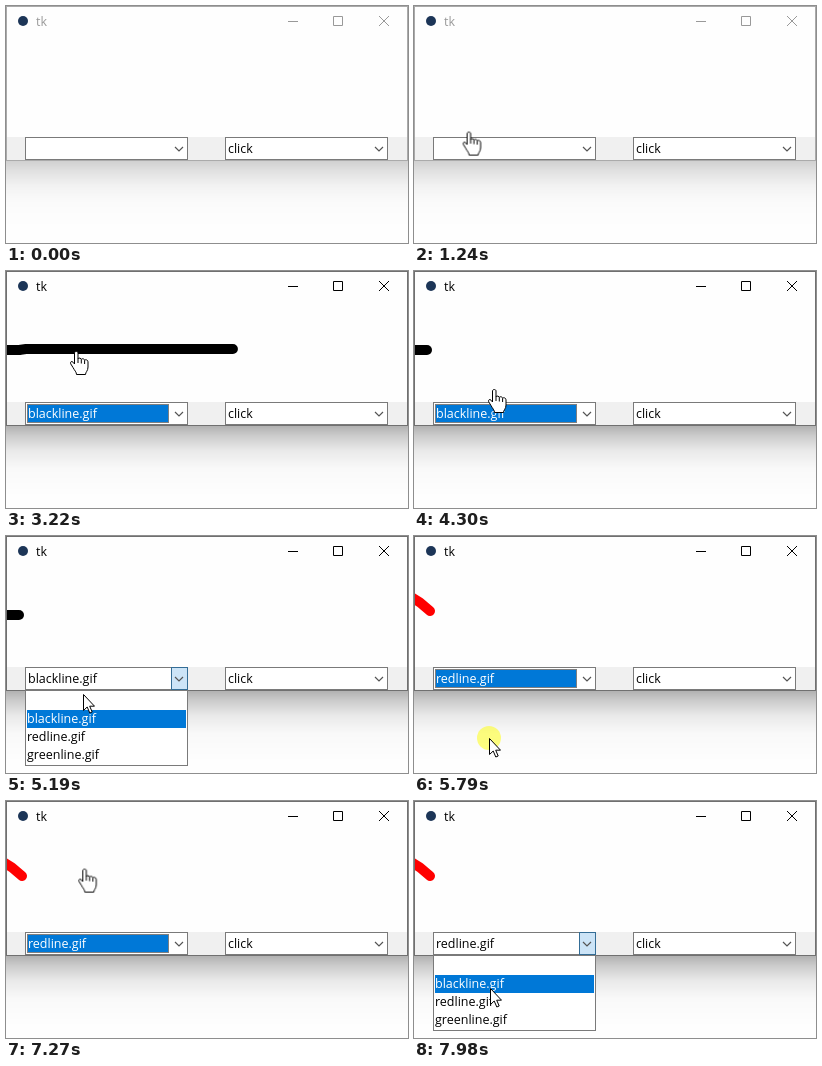
These frames come from a looping animation (402x237 px, 8000 ms). An HTML page:

```html
<!DOCTYPE html>
<html lang="en">
<head>
<meta charset="utf-8">
<title>tk</title>
<style>
html, body { margin: 0; width: 100%; height: 100%; overflow: hidden; background: #fefefe; }
svg { display: block; width: 402px; height: 237px; font: 12.5px "Open Sans", "Noto Sans", sans-serif; }

/* hard switches by default, all on one 8 s clock */
.a { animation: 8s step-end infinite; }

.ink { animation-name: ink; }
.frame { animation-name: frame; }
.shadow { animation-name: shadow; }
.open { animation-name: open; }
.sel { animation-name: sel; }
.value { animation-name: value; }
.black { animation-name: black; }
.red { animation-name: red; }
.row0 { animation-name: row0; }
.row1 { animation-name: row1; }
.row2 { animation-name: row2; }
.drawBlack { animation-name: drawBlack; stroke-dasharray: 400 500; }
.drawRed { animation-name: drawRed; stroke-dasharray: 100 200; }
.click { animation-name: click; }
.hand { animation-name: hand; }
.arrow { animation-name: arrow; }
.pointer { animation: move 8s ease-in-out infinite; }

@keyframes ink { 0% { color: #999 } 17.25%, 100% { color: #000 } }
@keyframes frame { 0% { stroke: #aaa } 17.25%, 100% { stroke: #707070 } }
@keyframes shadow { 0% { opacity: .6 } 17.25%, 100% { opacity: 1 } }
@keyframes open {
  0%, 28.2%, 72% { opacity: 0 }
  18.85%, 62%, 97.85%, 100% { opacity: 1 }
}
@keyframes sel {
  0%, 62%, 97.85%, 100% { opacity: 0 }
  28.2%, 72% { opacity: 1 }
}
@keyframes value {
  0%, 62%, 97.85%, 100% { fill: #000 }
  28.2%, 72% { fill: #fff }
}
@keyframes black { 0%, 72%, 100% { opacity: 0 } 28.2% { opacity: 1 } }
@keyframes red { 0% { opacity: 0 } 72%, 100% { opacity: 1 } }
@keyframes row0 {
  0%, 22.3%, 65.46%, 98.95%, 100% { opacity: 0 }
  21%, 65.2%, 98.5% { opacity: 1 }
}
@keyframes row1 {
  0%, 65.2%, 65.9% { opacity: 0 }
  22.3%, 65.46%, 98.95%, 100% { opacity: 1 }
}
@keyframes row2 { 0%, 98.5%, 100% { opacity: 0 } 65.9% { opacity: 1 } }
@keyframes drawBlack {
  0%, 43.7%, 100% { stroke-dashoffset: 400 }
  37.7% { stroke-dashoffset: 362 }
  38.95% { stroke-dashoffset: 274 }
  40.2% { stroke-dashoffset: 186 }
  41.45% { stroke-dashoffset: 98 }
  42.45% { stroke-dashoffset: 0 }
}
@keyframes drawRed {
  0%, 89.7%, 100% { stroke-dashoffset: 100 }
  81.25% { stroke-dashoffset: 86 }
  82.4% { stroke-dashoffset: 72 }
  83.5% { stroke-dashoffset: 57 }
  84.6% { stroke-dashoffset: 43 }
  85.8% { stroke-dashoffset: 29 }
  86.9% { stroke-dashoffset: 14 }
  88.6% { stroke-dashoffset: 0 }
}
@keyframes click {
  0%, 18.85%, 28.6%, 39%, 63%, 72.5%, 82%, 98.2%, 100% { opacity: 0 }
  17.25%, 27.2%, 36.5%, 61.5%, 71.2%, 80.05%, 96.85% { opacity: .5 }
}
@keyframes hand {
  0%, 16%, 55%, 92.65%, 100% { opacity: 0 }
  12%, 33.95%, 75.15% { opacity: 1 }
}
@keyframes arrow {
  0%, 16%, 55%, 92.65%, 100% { opacity: 1 }
  12%, 33.95%, 75.15% { opacity: 0 }
}
@keyframes move {
  0%, 8.35% { transform: translate(150px, -30px) }
  17.2%, 19.5% { transform: translate(47px, 138px) }
  23.4%, 31.5% { transform: translate(45px, 182px) }
  36.4%, 48.5% { transform: translate(70px, 80px) }
  52.5% { transform: translate(80px, 111px) }
  53.6%, 53.9% { transform: translate(80px, 118px) }
  55.25%, 58.25% { transform: translate(77px, 132px) }
  58.75%, 62.5% { transform: translate(77px, 134px) }
  64.8%, 65.1% { transform: translate(77px, 158px) }
  66.4%, 72.6% { transform: translate(75px, 202px) }
  77.6%, 90.6% { transform: translate(78px, 66px) }
  93.4%, 97.9% { transform: translate(91px, 143px) }
  99.6%, 100% { transform: translate(76px, 187px) }
}
</style>
</head>
<body>
<svg viewBox="0 0 402 237">
  <defs>
    <linearGradient id="fade" x2="0" y2="1">
      <stop offset="0" stop-opacity=".3"/>
      <stop offset=".15" stop-opacity=".19"/>
      <stop offset=".35" stop-opacity=".08"/>
      <stop offset=".6" stop-opacity=".02"/>
      <stop offset="1" stop-opacity="0"/>
    </linearGradient>
    <clipPath id="view"><path d="M1 31H401V131H1Z"/></clipPath>
    <path id="chevron" d="M169 141l4 4 4-4" fill="none" stroke="#555" stroke-width="1.2"/>
    <rect id="box" x="19.5" y="131.5" width="162" height="22" fill="#fff" stroke="#7a7a7a"/>
    <rect id="bar" x="21" y="156" width="159" height="18" fill="#0078d7"/>
  </defs>

  <!-- window -->
  <rect width="402" height="237" fill="#fefefe"/>
  <rect class="a shadow" y="155" width="402" height="71" fill="url(#fade)"/>
  <path d="M1 131H401V154H1Z" fill="#f0f0f0"/>
  <rect class="a frame" x=".5" y=".5" width="401" height="154" fill="none" stroke="#707070"/>
  <circle cx="17" cy="15" r="5" fill="#1c3557"/>
  <g class="a ink">
    <text x="30" y="20" fill="currentColor">tk</text>
    <path d="M282 15.5h10M327.5 10.5h9v9h-9zM373 10l10 10M383 10l-10 10" fill="none" stroke="currentColor"/>
  </g>

  <!-- strokes -->
  <g clip-path="url(#view)" fill="none" stroke-linecap="round" stroke-linejoin="round" stroke-width="10">
    <g class="a black" stroke="#000">
      <path d="M-5 79H13"/>
      <path class="a drawBlack" d="M13 79L20 78H315L350 75L380 73.5H410"/>
    </g>
    <g class="a red" stroke="#f00">
      <path d="M-3 61L6 66.5L16 75"/>
      <path class="a drawRed" pathLength="100" d="M16 75C40 95 50 102 70 102S110 56 135 56 175 102 200 102 240 56 265 56 300 85 325 90"/>
    </g>
  </g>

  <!-- combo boxes -->
  <use href="#box"/>
  <g class="a sel">
    <rect x="21" y="133" width="142" height="19" fill="#0078d7"/>
    <rect x="21.5" y="133.5" width="141" height="18" fill="none" stroke="#ff8728" stroke-dasharray="1 1"/>
  </g>
  <g class="a value">
    <text class="a black" x="22" y="147">blackline.gif</text>
    <text class="a red" x="22" y="147">redline.gif</text>
  </g>
  <use href="#chevron"/>
  <use href="#box" x="200"/>
  <use href="#chevron" x="200"/>
  <text x="222" y="147">click</text>

  <!-- drop-down list -->
  <g class="a open">
    <rect x="165.5" y="131.5" width="16" height="22" fill="#cce4f7" stroke="#346d96"/>
    <use href="#chevron"/>
    <rect x="19.5" y="154.5" width="162" height="75" fill="#fff" stroke="#7a7a7a"/>
    <text x="21" y="187">blackline.gif</text>
    <text x="21" y="205">redline.gif</text>
    <text x="21" y="223">greenline.gif</text>
    <use class="a row0" href="#bar"/>
    <g class="a row1"><use href="#bar" y="18"/><text x="21" y="187" fill="#fff">blackline.gif</text></g>
    <g class="a row2"><use href="#bar" y="36"/><text x="21" y="205" fill="#fff">redline.gif</text></g>
  </g>

  <!-- pointer -->
  <g class="pointer" stroke-linejoin="round">
    <circle class="a click" r="12" fill="#ff0"/>
    <path class="a arrow" d="M.5 .5V16.5L4.2 13L6.8 19L9.2 18L6.7 12.2H11.5Z" fill="#fff" stroke="#000"/>
    <g class="a hand" stroke="#000">
      <path d="M-1.5 2C-1.5 0 2 0 2 2V8C2 6.5 5.3 6.8 5.3 8.6C5.3 7.2 8.6 7.5 8.6 9.4C8.8 8.2 12 8.6 12 10.8V16C12 20 9.5 21 9.5 23.5H.5C.5 21-1.5 19.5-3 16.5L-5.3 12.8C-6.3 10.8-4 9.8-3 11.2L-1.5 13Z" fill="#fff"/>
      <path d="M2 8V12M5.3 9V12.5M8.6 9.5V13" fill="none"/>
    </g>
  </g>
</svg>
</body>
</html>
```
